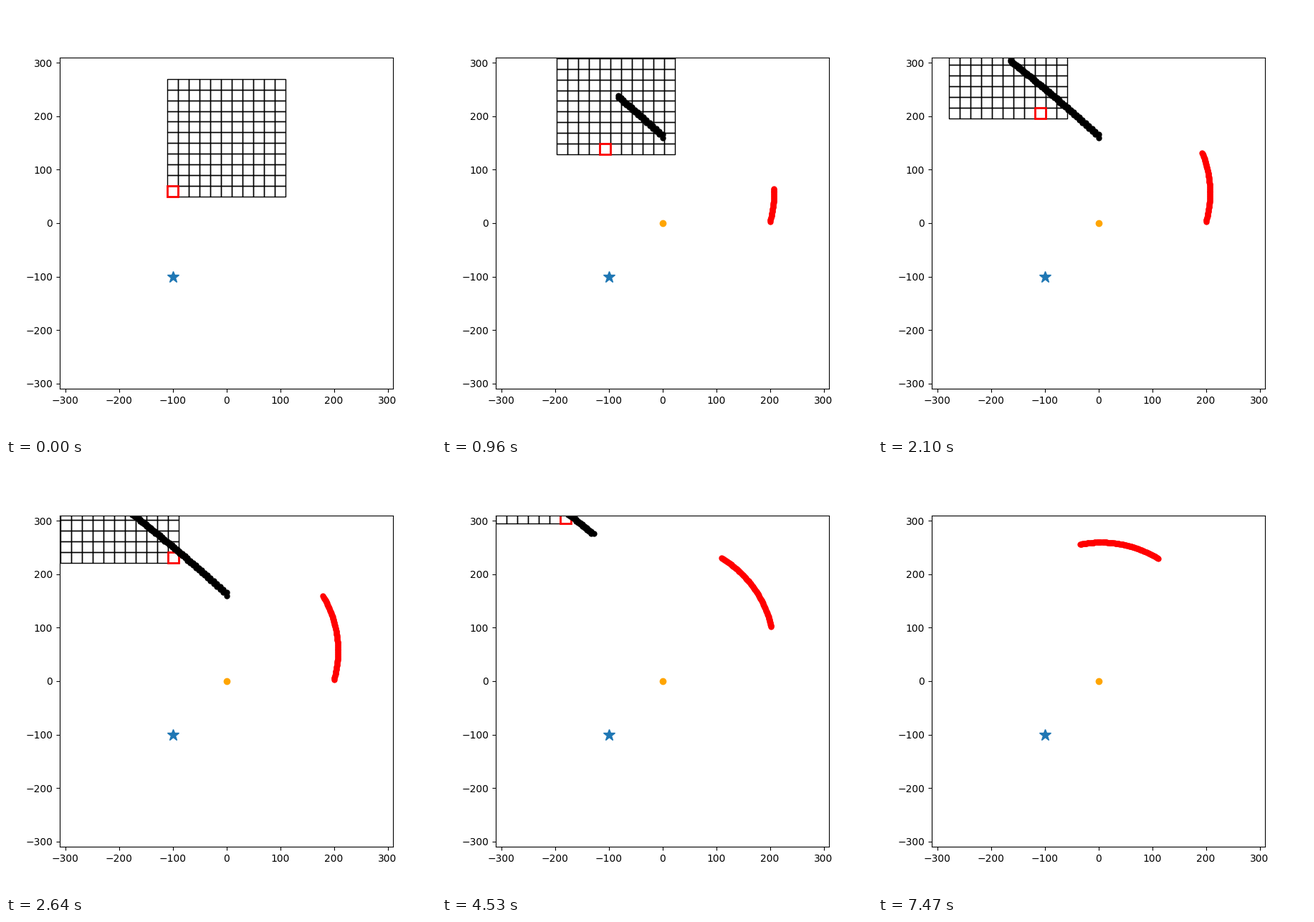
A matplotlib script that plays this animation: 600x600 px, repeating every 7500 ms.

```python
import numpy as np
import matplotlib.pyplot as plt
from matplotlib.animation import FuncAnimation
from matplotlib.collections import PolyCollection
from matplotlib.patches import Rectangle

FRAMES, INTERVAL = 250, 30
CELL, HALF = 20, 5      # cell size, cells on each side of the centre
TRAIL = 100             # longest trail, in dots
STAR = np.array([-100, -100])


def grid_centre(n):
    """Climb on odd steps, move left on even ones, slowing down."""
    left, up = n // 2, (n + 1) // 2
    return np.column_stack([-426 * (1 - np.exp(-left / 70)),
                            160 + 219.3 * np.log(1 + up / 37)])


def red_dot(n):
    """Circle anticlockwise, fast at first, then at a steady rate."""
    angle = np.radians(-15.5 + 0.42 * n + 12.5 * (1 - np.exp(-n / 66)))
    return np.column_stack([4.5 + 203 * np.cos(angle),
                            57 + 203 * np.sin(angle)])


steps = np.arange(FRAMES)
grid_path, red_path = grid_centre(steps), red_dot(steps)

# Corners of every cell relative to the grid centre
idx = np.arange(-HALF, HALF + 1) * CELL
centres = np.array([(x, y) for x in idx for y in idx])
corners = np.array([(-1, -1), (1, -1), (1, 1), (-1, 1)]) * CELL / 2
cells = centres[:, None, :] + corners

fig, ax = plt.subplots(figsize=(6, 6), dpi=100)
ax.set(xlim=(-310, 310), ylim=(-310, 310))

grid = PolyCollection(cells, facecolors="none", edgecolors="black",
                      linewidths=1, zorder=1)
ax.add_collection(grid, autolim=False)
nearest = Rectangle((0, 0), CELL, CELL, fill=False, ec="red", lw=2, zorder=1.5)
ax.add_patch(nearest)
ax.plot(*STAR, "*", color="C0", ms=12)
home, = ax.plot(0, 0, "o", color="orange")
black, = ax.plot([], [], "o", color="black", ms=5)
red, = ax.plot([], [], "o", color="red", ms=5)


def update(n):
    centre = grid_path[n]
    grid.set_verts(cells + centre)
    offset = np.clip(np.round((STAR - centre) / CELL), -HALF, HALF)
    nearest.set_xy(centre + offset * CELL - CELL / 2)

    seen = slice(max(0, n - TRAIL), n)
    black.set_data(*grid_path[seen].T)
    red.set_data(*red_path[seen].T)
    home.set_visible(n > 0)
    return grid, nearest, home, black, red


anim = FuncAnimation(fig, update, frames=FRAMES, interval=INTERVAL,
                     init_func=lambda: update(0), repeat=True, repeat_delay=0)
plt.show()
```
